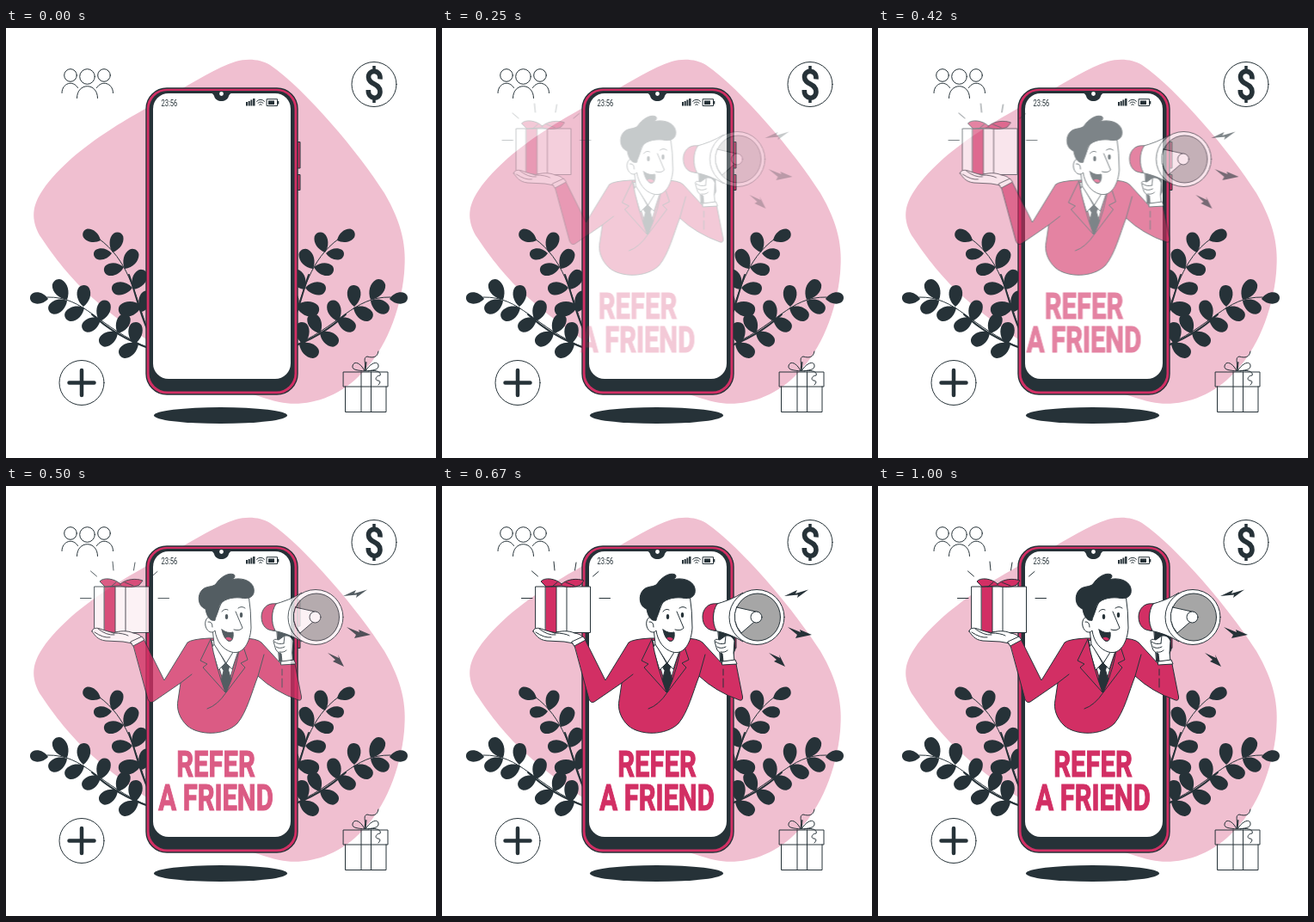
An HTML page for the animation above (1.04 s loop, 500x500 px).

```html
<!DOCTYPE html>
<html lang="en">
<head>
<meta charset="utf-8">
<title>Refer a friend</title>
<style>
  html, body { margin: 0; width: 100%; height: 100%; overflow: hidden; background: #fff; }
  svg { display: block; width: 100%; height: 100%; --dark: #263238; --pink: #d22f64; }
  .line { fill: none; stroke: var(--dark); stroke-width: 1; stroke-linejoin: round; stroke-linecap: round; }
  .white { fill: #fff; }
  .pink { fill: var(--pink); }
  .gray { fill: #a6a6a6; }
  .dark { fill: var(--dark); }
  text { font-family: Roboto, "Liberation Sans", sans-serif; }
  .title { font-size: 43px; font-weight: 700; fill: var(--pink); stroke: var(--pink); stroke-width: 1.2; text-anchor: middle; }
</style>
</head>
<body>
<svg viewBox="0 0 500 500">
  <path fill="#f0bfd0" d="M267 39C280 35 296 36 307 43C350 73 410 145 440 192C461 228 466 255 463 285C459 330 440 375 415 400C385 433 345 441 318 435C260 422 160 370 92 306C66 281 50 257 39 241C29 222 30 207 43 188C80 135 160 95 190 79C220 62 245 46 267 39Z"/>

  <!-- plants -->
  <g id="plant">
    <path class="line" d="M108 245C142 270 148 304 165 352"/>
    <path class="line" d="M48 313C92 312 105 347 168 373"/>
    <path class="line" stroke-width="2" style="stroke-width:2" d="M143 287C150 306 155 330 165 352M100 333Q128 359 168 373"/>
    <path id="leaves" class="dark"/>
  </g>
  <use href="#plant" transform="translate(495) scale(-1 1)"/>

  <!-- corner icons -->
  <g class="line">
    <circle cx="94.5" cy="56.5" r="8.8"/>
    <circle cx="75" cy="55" r="7.3"/>
    <circle cx="114" cy="55" r="7.3"/>
    <path d="M82.5 81.500C82.500 63 106.500 63 106.500 81.500M65 75.500C65 64 78 60 83.500 69.500M124.500 75.500C124.500 64 111 60 105.500 69.500"/>
    <circle cx="428" cy="65.500" r="26"/>
    <circle cx="88" cy="412.500" r="26"/>
    <path d="M392.500 400h51.500v17h-51.500zM394.500 417v29.500h47.500V417M413 400v46.500M424.500 400v46.500"/>
    <path d="M417 399C412 388 404 387 403 393C402 398 410 398 417 399C417 393 419 386 419 389L418 399C424 389 432 387 433 392C434 398 426 398 418 399C418 388 415 383 420 382C427 384 432 383 433 376M421 399C430 397 437 400 435 404C430 404 428 410 433 410Q437 411 433 415"/>
  </g>
  <path class="line" style="stroke-width:4.500" d="M73.500 412.500h29M88 398v29"/>
  <path class="line" style="stroke-width:5.600;stroke-linecap:butt" d="M435 59.500C436 47.500 421.500 48 421.500 57C421.500 66 435 64 435 74C435 84 421 84 421.300 72"/>
  <path class="line" style="stroke-width:3.500;stroke-linecap:butt" d="M428 44v7M428 80v7"/>

  <!-- phone -->
  <ellipse class="dark" cx="249.500" cy="450.500" rx="77.500" ry="9.500"/>
  <path class="line pink" style="fill:var(--pink)" d="M338 132.500h4v30.500h-4zM338 170.500h4v18h-4z"/>
  <rect class="line" style="fill:var(--pink);stroke-width:1.400" x="163" y="70" width="176" height="356" rx="24"/>
  <rect class="dark" x="166.500" y="73" width="169" height="349.500" rx="21"/>
  <rect class="white" x="171" y="76" width="160" height="332" rx="18"/>
  <path class="dark" d="M237 75Q241 76 242 79C244 87 257 87 259 79Q260 76 264 75Z"/>
  <circle class="white" cx="250.500" cy="76.500" r="2.400"/>
  <text class="dark" font-size="10.800" transform="translate(180.500 90.800) scale(.7 1)">23:56</text>
  <path class="dark" d="M279 86h2v4.500h-2zM281.700 85h2v5.500h-2zM284.400 83.500h2v7h-2zM287.100 82h2.400v8.500h-2.400zM305 84.500h7v4.500h-7zM316 85h1.300v3.500H316z"/>
  <path class="line" d="M291.500 85.300Q296 81 300.500 85.300M293 87.300Q296 84.500 299 87.300M294.700 89.200Q296 88 297.300 89.200M303.500 82.700h12v7.800h-12z"/>

  <g id="offer">
    <text class="title" transform="translate(250 338) scale(.72 1)">REFER</text>
    <text class="title" transform="translate(250 377) scale(.72 1)">A FRIEND</text>

    <!-- suit -->
    <g class="line">
      <path style="fill:var(--pink)" d="M154 184L166 178L190 226L217 182Q222 178 242 177L280 177Q298 177 303 182L326 207L342 207L349.500 245Q350 250 346 249Q318 239 299 221C292 239 286 263 275 276C260 291 230 290 217 279C207 270 204 258 206 249L209 229L177 251Q173 253 171 248Z"/>
      <path d="M209 229L222 219M299 221L306 196M327 213v7M327 224v10"/>
      <path class="white" style="fill:#fff" d="M245 180L262 240L279 180L270 176Z"/>
      <path class="dark" style="fill:var(--dark)" d="M256.500 210L262 205L266 209L264.500 214L268 226L262 240L256 227L259 215Z"/>
      <path style="fill:#fff" d="M249 184L261 206L253 214L245 188ZM274 184L262 206L269 213L278 186Z"/>
      <path style="fill:var(--pink)" d="M244 178L232 203L240 207L235 211L261 240Q250 210 244 178ZM279 178L287 202L279 206L284 211L262 240Q275 212 279 178Z"/>
      <path d="M262 240Q252 255 240 259"/>
    </g>

    <!-- head -->
    <g class="line">
      <path style="fill:#fff" d="M246 165L248 184L262 206L274 187Z"/>
      <path style="fill:#fff" d="M249 152C243 149 236 154 238 163C240 170 246 172 249 168C251 181 258 190 268 193C282 197 290 181 291 165Q291 145 288 126L262 124Z"/>
      <path style="fill:var(--dark)" d="M245 156C241 154 239 149 238 143C229 140 228 127 234 121C238 116 246 118 250 114C255 106 265 100 271 103Q274 106 268 109C278 106 292 109 294 119C296 129 288 132 279 130C268 129 258 132 254 139C253 147 250 151 249 156Z"/>
      <path d="M273 146L281 165Q278 169 271 167M257 146Q260 142 264 144M276 142Q280 139 284 142M241 158Q246 157 246 164"/>
      <path style="fill:var(--dark)" d="M257 167Q264 172 270 170C271 178 268 182 264 180Q259 177 257 167Z"/>
      <path style="fill:var(--pink);stroke:none" d="M261 177Q265 174 269 178Q266 182 261 177Z"/>
    </g>
    <ellipse class="dark" cx="262.500" cy="152" rx="1.700" ry="3"/>
    <ellipse class="dark" cx="279.500" cy="150" rx="1.700" ry="3"/>

    <!-- held present -->
    <g class="line">
      <path style="fill:#fff" d="M109 117h63.500v53.500H145L109 168Z"/>
      <path style="fill:var(--pink)" d="M120.500 117h12.500v53.500l-12.500-1.500z"/>
      <path d="M145 117v53.500"/>
      <path style="fill:var(--pink)" d="M139 114C132 107 119 106 115 111L121 117L139 116C146 118 155 118 161 115L165 110C157 107 146 108 139 114ZM134 112L128 117M144 112L154 116"/>
      <path d="M104.500 99l7 6M130 88l1 10M156 89l-1.500 9M182 99.500l-6.500 5.500M92.500 130.500h12.500M183 130.500h12.500"/>
      <path style="fill:#fff" d="M106 169C106 165 112 164 118 167L131 171C138 168 148 168 154 171C160 172 164 174 165 179L156 184Q149 182 142 181L122 180C112 179 109 173 106 169Z"/>
      <path d="M109 170Q119 177 127 176M113 166Q123 174 132 173M131 171Q143 171 148 174"/>
      <path style="fill:#fff" d="M151 181L164 175L167 179L154 186Z"/>
    </g>

    <!-- megaphone -->
    <g class="line">
      <path style="fill:var(--dark)" d="M321 166L340 170L341 190L334 205L324 204Z"/>
      <path style="fill:#fff" d="M316 138Q336 133 350 124L350 181Q334 171 316 168Z"/>
      <path style="fill:var(--pink)" d="M320 137C309 135 303 144 303 152C303 162 309 169 319 168C314 159 314 146 320 137Z"/>
      <circle cx="366" cy="152.500" r="32" style="fill:#fff"/>
      <ellipse cx="367" cy="152.500" rx="26.500" ry="27.500" style="fill:#a6a6a6"/>
      <path style="fill:#fff" d="M342.500 141L367 146.500L363 158L348 171Q336 157 342.500 141Z"/>
      <circle cx="365.500" cy="152.500" r="6.500" style="fill:#fff"/>
      <path style="fill:#fff" d="M317 180Q317 177 323 179L330 174Q337 173 340 180L339 194L340 204L327 204L326 195Q320 193 319 188Z"/>
      <path d="M318 181Q323 185 329 183M320 187Q324 190 330 187M324 193Q329 194 332 191M330 174L329 183"/>
      <path style="fill:#fff" d="M326 204L341 202L343 207L326 208Z"/>
    </g>
    <path class="dark" d="M398 128L413 121L411 125L426 120.500L413 130L414 126.500ZM402 164L417 170L416 167L430 173L411 177L413 173ZM380 194L393 200L392 196L399 210L386 204L389 202Z"/>
  </g>
</svg>
<script>
const STEP = 24 / 1000, LOOP = 1040;

// Each leaf runs from its base to its tip.
const leaves = [
  [110, 247, 90, 237], [124, 261, 132, 238], [123, 262, 102, 263],
  [138, 280, 151, 258], [137, 278, 114, 282], [148, 304, 161, 282],
  [147, 302, 123, 303], [158, 323, 131, 329], [158, 330, 166, 306],
  [49, 315, 28, 313], [71, 316, 58, 293], [71, 317, 50, 329],
  [90, 324, 91, 299], [91, 325, 69, 337], [109, 341, 117, 317],
  [110, 338, 89, 350], [130, 355, 141, 333], [130, 354, 109, 367],
  [149, 368, 152, 342], [154, 367, 132, 380]
];

function leafPath([x, y, tipX, tipY]) {
  const dx = tipX - x, dy = tipY - y;
  const at = (u, v) => `${x + u * dx - v * dy} ${y + u * dy + v * dx} `;
  return `M${at(0, 0)}C${at(.2, -.28)}${at(.62, -.42)}${at(.88, -.25)}` +
    `C${at(1.04, -.12)}${at(1.04, .12)}${at(.88, .23)}C${at(.62, .38)}${at(.25, .3)}${at(0, 0)}Z`;
}
document.getElementById("leaves").setAttribute("d", leaves.map(leafPath).join(""));

const offer = document.getElementById("offer");

function draw(now) {
  const n = Math.min(24, Math.floor((now % LOOP + 5) * STEP));
  const x = 2 - 2 * ((n - 20) / 4) ** 2;   // slides in, drifts past, settles back
  const fade = Math.min(1, Math.max(0, (n - 1) / 13)) ** 1.4;
  offer.setAttribute("transform", `translate(${x})`);
  offer.setAttribute("opacity", fade);
}

const start = performance.now();
function tick() {
  draw(performance.now() - start);
  requestAnimationFrame(tick);
}
tick();
</script>
</body>
</html>
```
